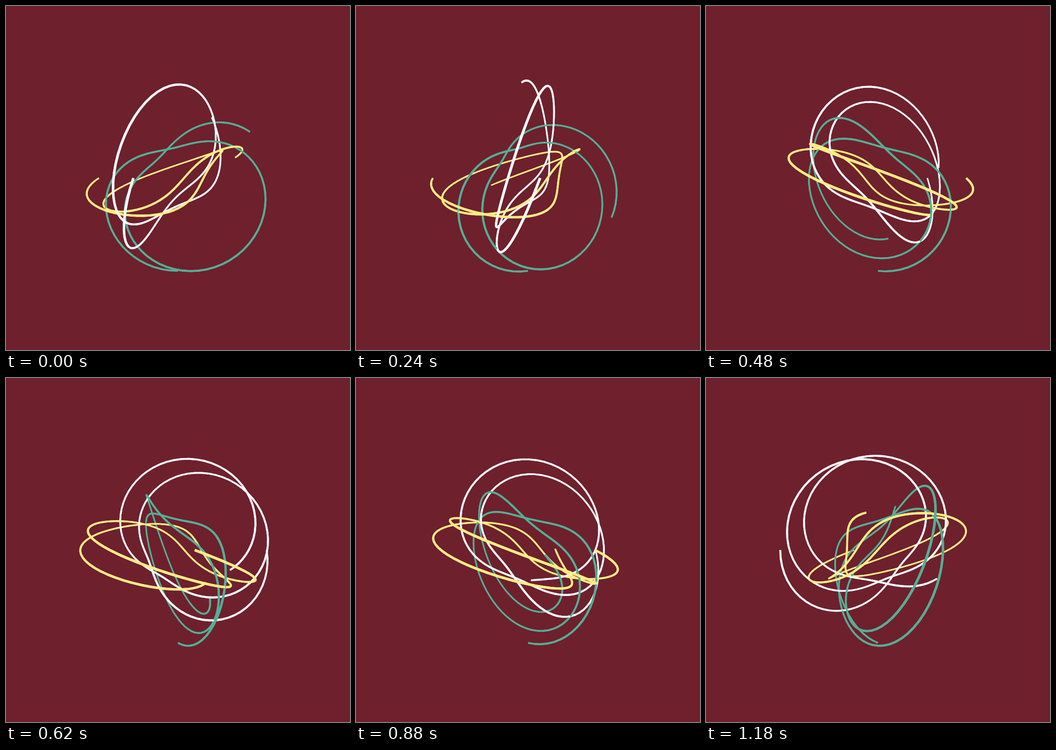
An HTML page with a canvas that plays this animation: 748 px wide and 748 px high, repeating every 1.2 s.

```html
<!DOCTYPE html>
<html>
<head>
<meta charset="utf-8">
<style>
  html, body { margin: 0; width: 100%; height: 100%; overflow: hidden; background: #6e202d; }
  canvas { display: block; }
</style>
</head>
<body>
<canvas width="748" height="748"></canvas>
<script>
const ctx = document.querySelector('canvas').getContext('2d');
const SIZE = 748, CENTER = SIZE / 2;
const CAMERA = CENTER / Math.tan(Math.PI / 6);
const MAJOR = SIZE * 0.18, MINOR = SIZE * 0.09;
const WEIGHT = 4, FRAME_MS = 20, FRAMES = 60;
const { sin, cos } = Math;

// Torus knot, one vertex per step
function knot(step) {
  const around = step * 0.08, tube = step * 0.09;
  const radius = MAJOR + MINOR * cos(tube);
  return [radius * cos(around), radius * sin(around), MINOR * sin(tube)];
}

// The same knot laid along each of the three axes
const strands = [
  { color: '#f6faff', place: ([a, b, c]) => [a, b, c] },
  { color: '#56ad95', place: ([a, b, c]) => [c, a, b] },
  { color: '#ffec85', place: ([a, b, c]) => [b, c, a] }
];

function project([x, y, z], turn) {
  const depth = z * cos(turn) - x * sin(turn);
  const scale = CAMERA / (CAMERA - depth);
  return {
    x: CENTER + (x * cos(turn) + z * sin(turn)) * scale,
    y: CENTER + y * scale,
    depth, scale
  };
}

function draw(steps) {
  const turn = steps * 32 / 3;
  const pieces = [];
  for (const { color, place } of strands) {
    const points = Array.from({ length: steps + 1 }, (_, i) => project(place(knot(i)), turn));
    for (let i = 1; i < steps; i++) {
      pieces.push({ color, points: points.slice(i - 1, i + 2), depth: points[i].depth, scale: points[i].scale });
    }
  }
  pieces.sort((a, b) => a.depth - b.depth);

  ctx.fillStyle = '#6e202d';
  ctx.fillRect(0, 0, SIZE, SIZE);
  ctx.lineJoin = 'round';
  for (const { color, points, scale } of pieces) {
    ctx.strokeStyle = color;
    ctx.lineWidth = WEIGHT * scale;
    ctx.beginPath();
    for (const p of points) ctx.lineTo(p.x, p.y);
    ctx.stroke();
  }
}

function tick(now) {
  const frame = Math.floor(now / FRAME_MS) % FRAMES;
  // The loop skips one step after its opening pose
  draw(frame ? 131 + frame : 130);
  requestAnimationFrame(tick);
}
tick(0);
</script>
</body>
</html>
```
